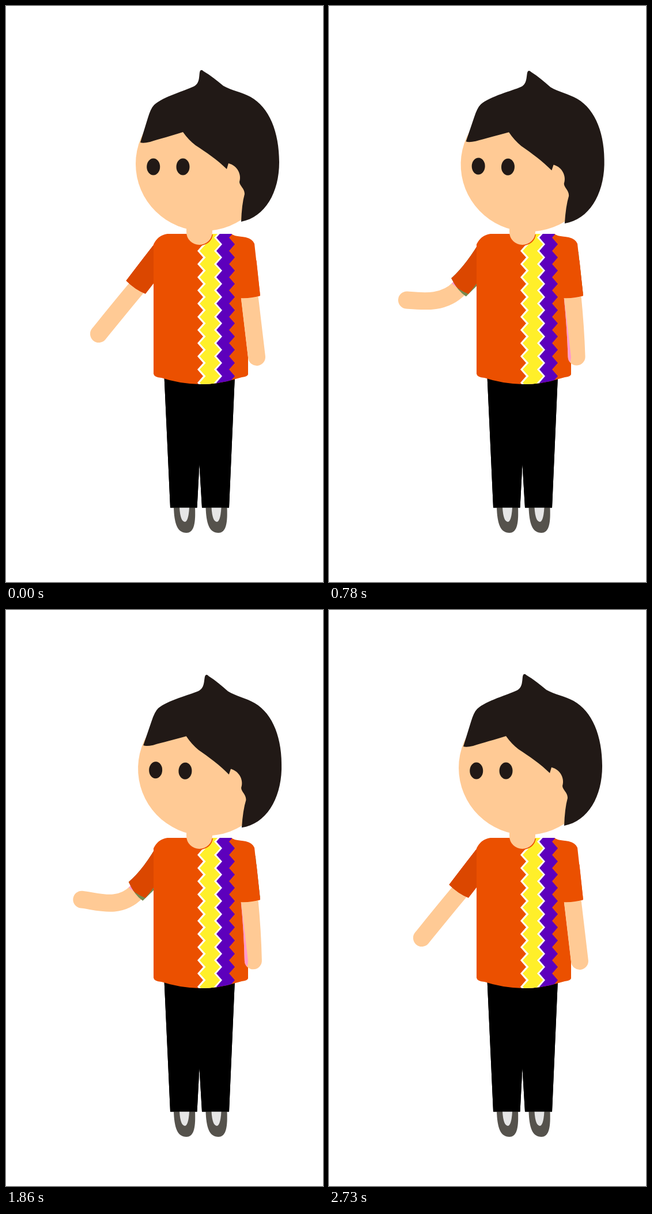
These frames come from a looping animation (550x996 px, 2.76 s). An HTML page with a canvas:

```html
<!DOCTYPE html>
<html lang="en">
<head>
<meta charset="utf-8">
<title>Waving boy</title>
<style>
html, body { margin: 0; width: 100%; height: 100%; overflow: hidden; background: #fff; }
canvas { display: block; width: 100%; height: 100%; }
</style>
</head>
<body>
<canvas id="stage" width="550" height="996"></canvas>
<script>
const ctx = document.getElementById('stage').getContext('2d');
const LOOP = 2760, STEP = 30;
const SKIN = '#ffca95', HAIR = '#211916', ORANGE = '#eb5000', SLEEVE = '#db4700';
const YELLOW = '#ffef2a', PURPLE = '#5d00bc', PINK = '#ff99cc', GREEN = '#75894e';

// time, hand x/y, forearm control x/y, elbow control x/y
const ARM_KEYS = [
  [0, 161, 567, 183, 540, 204, 514],
  [480, 140, 530, 172, 524, 205, 512],
  [1080, 130, 487, 158, 498, 195, 518],
  [1230, 127, 476, 156, 495, 194, 517],
  [1620, 136.5, 509, 163, 508, 196, 519],
  [2340, 121, 484, 152, 495, 197, 517],
  [2730, 161, 567, 183, 540, 204, 514],
  [2760, 161, 567, 183, 540, 204, 514]
];

const lerp = (a, b, k) => a + (b - a) * k;

function armPose(t) {
  let i = 0;
  while (t >= ARM_KEYS[i + 1][0]) i++;
  const a = ARM_KEYS[i], b = ARM_KEYS[i + 1];
  const k = (t - a[0]) / (b[0] - a[0]);
  return a.map((v, n) => lerp(v, b[n], k)).slice(1);
}

function fill(path, color) {
  ctx.fillStyle = color;
  ctx.fill(path);
}

function stroke(path, color, width, cap = 'round') {
  ctx.strokeStyle = color;
  ctx.lineWidth = width;
  ctx.lineCap = cap;
  ctx.lineJoin = 'round';
  ctx.stroke(path);
}

function clipped(area, draw) {
  ctx.save();
  ctx.clip(area);
  draw();
  ctx.restore();
}

const body = new Path2D(`M280 394 H391 C396 398 403 398 416 400 Q428 403 431 411
  L441 501 Q426 506 408 505 L420 607 V637 Q419 641 409 642 L398 645
  Q370 654 336 654 Q300 653 270 643 Q257 642 256 636 V412 Q264 396 280 394 Z`);
const rightSleeve = new Path2D('M404 440 H434.5 L441 501 Q426 506 404 505 Z');
const pants = new Path2D('M274.5 640 H397 L387 867.5 H340 L335.5 792 L331.5 867.5 H285 Z');
const shoe = new Path2D('M291 867 H328 C329 892 327 911 313 911 C297 911 292 895 291 867 Z');
const tongue = new Path2D('M301 867 H318 C317 885 314 892 310 892 C305 891 302 884 301 867 Z');
const neck = new Path2D('M313 380 H358 V391 A22.5 22 0 0 1 313 391 Z');
const collar = new Path2D('M338 413 Q355 410 357.5 395');
const newSkinOnShirt = new Path2D('M390 505 H408 L420 607 Q420 613 417 620 V640 H390 Z');
const hair = new Path2D(`M233 236 L246 194 Q251 177 257 171 C272 157 312 146 326 139
  C338 133 334 117 337 112 Q339 109 343 113 C355 120 366 129 377 138
  C391 146 409 149 424 157 C457 175 474 218 474 270 C474 322 450 365 408 373
  Q409 343 414 325 C414 315 405 311 405 304 C409 292 402 276 386 272
  L383 282 C368 267 346 252 329 241 Q317 232 307 218
  C288 224 266 230 250 235 Q238 238 233 236 Z`);

function eye(x) {
  const p = new Path2D();
  p.ellipse(x, 278, 11.5, 14.5, 0, 0, 7);
  return p;
}
const eyes = [eye(255.7), eye(307)];
const face = new Path2D();
face.ellipse(343, 273, 118, 116, 0, 0, 7);

// Vertical band with matching zigzag edges
function band(left, right, reach) {
  const p = new Path2D(), half = 11.4, rows = 24;
  for (let i = 0; i <= rows; i++) p.lineTo(left + (i % 2 ? 0 : reach), 389.2 + i * half);
  for (let i = rows; i >= 0; i--) p.lineTo(right + (i % 2 ? 0 : reach), 389.2 + i * half);
  p.closePath();
  return p;
}
const bands = [
  [band(332, 367, 10), '#fff'],
  [band(365, 387, 10), PURPLE],
  [band(336, 361, 10.5), YELLOW]
];

function leftSleeve(s) {
  return new Path2D(`M266 400 Q${240 - s} ${433 + s * 19} ${208 + 6 * s} ${475 - 6 * s}
    Q${224 - s} ${491 + s * 3} ${242 - 6 * s} ${498 + 6 * s} L256 ${480 + 6 * s} H266 Z`);
}
const restSleeve = leftSleeve(0);

function drawLeftArm(t) {
  const [hx, hy, fx, fy, ex, ey] = armPose(t);
  const s = (567 - hy) / 83;
  const arm = new Path2D(`M${hx} ${hy} C${fx} ${fy} ${ex} ${ey} 226 488 L240 473`);
  const sleeve = leftSleeve(s);
  stroke(arm, SKIN, 30);
  if (s > 0) clipped(restSleeve, () => stroke(arm, PINK, 30));
  if (s > 0) fill(sleeve, GREEN);
  clipped(restSleeve, () => fill(sleeve, SLEEVE));
}

function drawRightArm(p) {
  const arm = new Path2D(`M422.5 502 Q${429 - 2 * p} 555 ${435 - 9.5 * p} ${607 - p}`);
  stroke(arm, SKIN, 30);
  if (p > 0.05) clipped(newSkinOnShirt, () => stroke(arm, PINK, 30));
  fill(rightSleeve, ORANGE);
}

function drawBody(p) {
  fill(pants, '#000');
  for (const dx of [0, 55.5]) {
    ctx.save();
    ctx.translate(dx, 0);
    fill(shoe, '#55524c');
    fill(tongue, '#e6e6e6');
    ctx.restore();
  }
  fill(pants, '#000');
  if (p > 0.3) stroke(new Path2D('M432 425 L440 497'), GREEN, 2.4 * p, 'butt');
  fill(body, ORANGE);
  clipped(body, () => bands.forEach(([path, color]) => fill(path, color)));
}

function drawHead(p) {
  ctx.save();
  ctx.translate(298, 408);
  ctx.rotate(0.047 * p);
  ctx.translate(-298, -408);
  fill(face, SKIN);
  fill(hair, HAIR);
  eyes.forEach(e => fill(e, HAIR));
  ctx.restore();
}

function frame(now) {
  const t = Math.floor(now % LOOP / STEP) * STEP;
  const p = Math.max(0, 1 - Math.abs(t - 1370) / 1370);
  ctx.fillStyle = '#fff';
  ctx.fillRect(0, 0, 550, 996);
  drawLeftArm(t);
  drawBody(p);
  drawRightArm(p);
  drawHead(p);
  stroke(collar, ORANGE, 3, 'butt');
  fill(neck, SKIN);
}

const start = performance.now();
function tick() {
  frame(performance.now() - start);
  requestAnimationFrame(tick);
}
tick();
</script>
</body>
</html>
```
